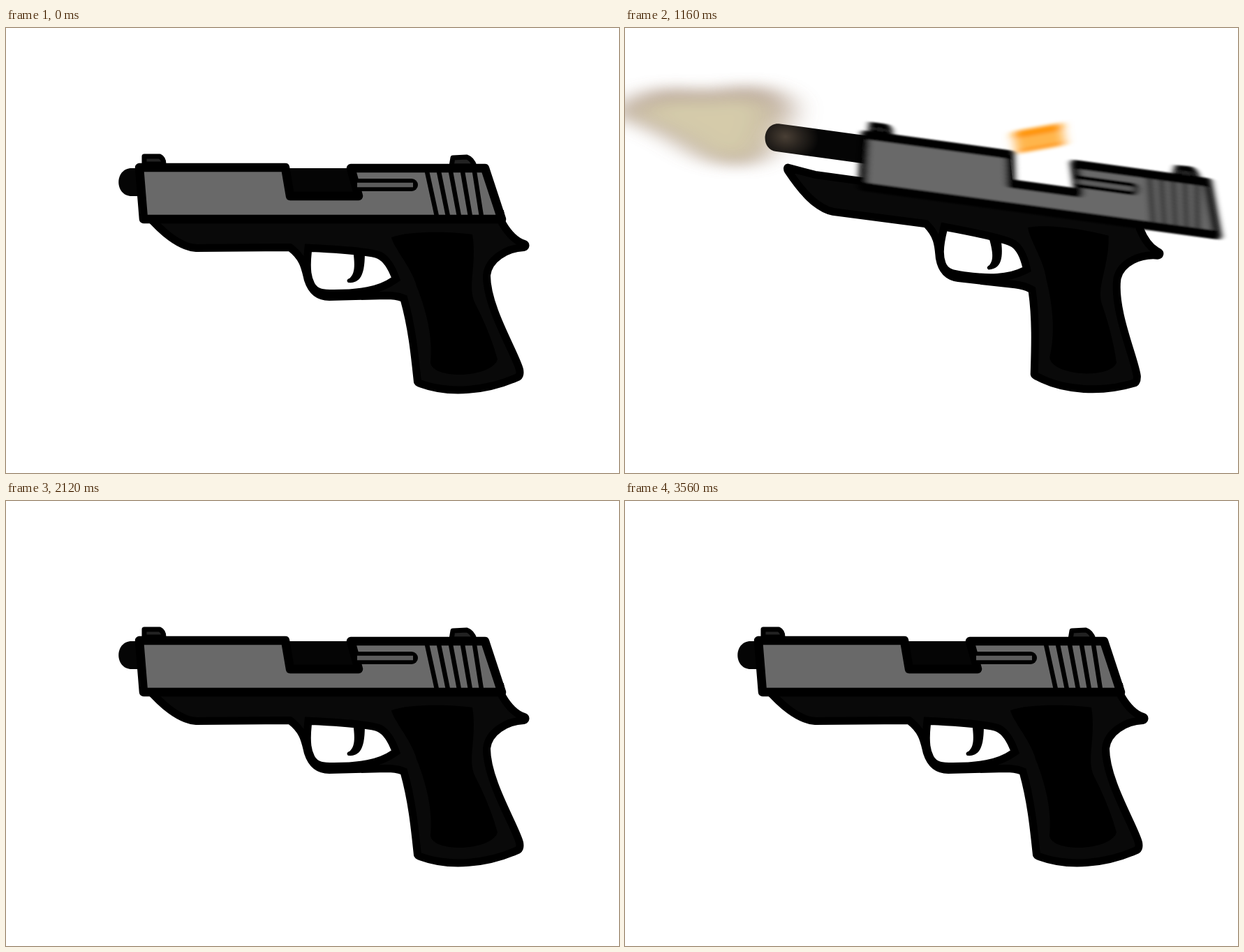
Animation of 878x638 px, one loop 3.84 s. Source, as an HTML page:

```html
<!DOCTYPE html>
<html lang="en">
<head>
<meta charset="utf-8">
<title>Pistol loop</title>
<style>
  html, body { margin: 0; width: 100%; height: 100%; overflow: hidden; background: #fff; }
  svg { display: block; width: 100vw; height: 100vh; }
  .glow { mix-blend-mode: screen; }
  .line { fill: none; stroke: #000; stroke-linecap: round; }
</style>
</head>
<body>
<svg viewBox="0 0 878 638">
  <defs>
    <filter id="slideBlur" x="-10%" y="-10%" width="120%" height="120%"><feGaussianBlur/></filter>
    <filter id="shellBlur" x="-50%" y="-50%" width="200%" height="200%"><feGaussianBlur stdDeviation="8 2.5"/></filter>
    <filter id="blastBlur" x="-80%" y="-100%" width="260%" height="300%"><feGaussianBlur/></filter>
    <radialGradient id="hot">
      <stop stop-color="#6a5000"/><stop offset="1" stop-color="#000"/>
    </radialGradient>
    <radialGradient id="warm">
      <stop stop-color="#453b31"/><stop offset="1" stop-color="#000"/>
    </radialGradient>
    <radialGradient id="haze">
      <stop stop-color="#777" stop-opacity=".36"/><stop offset=".5" stop-color="#888" stop-opacity=".16"/>
      <stop offset="1" stop-color="#999" stop-opacity="0"/>
    </radialGradient>
    <path id="framePath" clip-rule="evenodd" fill-rule="evenodd" d="M199 257C194 258 193 264 197 269C220 295 245 318 272 320L405 319
      C423 333 424 346 428 362C435 384 448 390 463 390L545 388Q558 388 566 391C577 430 581 470 585 508Q586 512 592 514
      C635 530 690 525 736 504Q742 500 740 489C734 465 693 400 693 355C695 335 718 320 742 319C750 317 751 308 743 305
      C731 301 722 290 715 278L712 262L240 262Z
      M437 320C434 348 437 358 441 366C446 376 455 376 470 376C505 376 533 372 553 358C548 345 541 334 533 330Q520 324 437 320Z"/>
    <clipPath id="frameClip"><use href="#framePath" clip-rule="evenodd"/></clipPath>
  </defs>
  <rect width="878" height="638" fill="#fff"/>
  <ellipse id="puff" cx="522" cy="182" rx="125" ry="115" fill="url(#haze)"/>
  <g id="blast" filter="url(#blastBlur)">
    <path id="outer" d="M-100-18C-70-60-40-68 0-56C40-66 75-74 92-38C98-10 78 40 62 62C40 76 10 70-12 48C-40 18-70-2-100-18Z"/>
    <path id="inner" d="M-72-18C-50-42-25-42 5-36C35-44 62-48 68-22C66 10 58 40 44 55C26 62 8 48-8 30C-30 8-50-6-72-18Z"/>
  </g>
  <g id="gun">
    <path fill="#050505" d="M180 201H512L522 241H180C155 241 155 201 180 201Z"/>
    <path id="trigger" d="M497 318H514C514 345 512 367 490 365C487 362 489 360 492 359C500 352 500 340 497 318Z"/>
    <use href="#framePath" stroke="#000" stroke-width="2"/>
    <use href="#framePath" fill="#090909" stroke="#000" stroke-width="20" clip-path="url(#frameClip)"/>
    <path d="M552 300C580 290 640 292 668 296C675 340 660 370 672 395C690 430 700 460 704 475C700 490 670 497 650 497
      C630 497 610 492 608 480C612 440 600 400 588 370C582 345 555 315 552 300Z"/>
    <g id="slide">
      <g fill="#222" stroke="#000" stroke-width="7" stroke-linejoin="round">
        <path d="M198 195V184H220Q226 187 226 195Z"/>
        <path d="M638 198L640 186L660 185Q668 188 671 198Z"/>
      </g>
      <path fill="#696969" stroke="#000" stroke-width="12.5" stroke-linejoin="round"
        d="M191 200H400L407 241H505L494 201H686L710 274H197Z"/>
      <path class="line" stroke-width="18" d="M504 225H581"/>
      <path class="line" style="stroke:#5c5c5c;stroke-linecap:butt" stroke-width="6.5" d="M503 225H583"/>
      <path class="line" stroke-width="6.5" d="M603 206l14 64M620 206l13 64M637 206l12 64M654 206l11 64M671 206l10 64"/>
    </g>
  </g>
  <g id="flash">
    <ellipse class="glow" cx="200" cy="228" rx="44" ry="66" fill="url(#hot)"/>
    <circle class="glow" cx="495" cy="208" r="32" fill="url(#hot)"/>
    <circle class="glow" cx="655" cy="188" r="32" fill="url(#hot)"/>
  </g>
  <ellipse id="tip" class="glow" cx="190" cy="218" rx="48" ry="36" fill="url(#warm)"/>
  <g id="shell">
    <rect x="-35" y="-16" width="70" height="32" rx="3" fill="#ff960f"/>
    <rect x="-35" y="-5" width="70" height="16" fill="#ffb54c"/>
  </g>
</svg>
<script>
const STEP = 40, LOOP = 3840, SHOTS = [840, 1080, 1880], RACK = 2960;

// One value per step of a shot
const TILT = [0, 4.2, 7.8, 4.63, 2.2, 0.8];
const SLIDE = [0, 56, 112, 55, 0, 0];
const PULL = [-24, -24, -16, -8, 0, 0];
const SLIDE_BLUR = [0, 2.5, 5, 2.5, 0, 0];
// x, y, scale x, scale y, blur x, blur y, opacity
const BLAST = [
  [95, 220, 1, 1, 6, 6, 1],
  [100, 195, 1.1, 0.95, 9, 8, 0.9],
  [112, 138, 1.35, 0.85, 16, 11, 0.8],
  [90, 135, 1.25, 1.75, 24, 22, 0.7],
  [90, 130, 1.3, 1.9, 30, 28, 0.35],
  [90, 120, 1.3, 2, 34, 32, 0.12]
];
const RACK_SLIDE = [47, 106, 53];

const $ = id => document.getElementById(id);
const set = (id, attrs) => {
  for (const name in attrs) $(id).setAttribute(name, attrs[name]);
};
const toggle = (id, on) => { $(id).style.display = on ? '' : 'none'; };
const show = (id, opacity) => {
  toggle(id, opacity > 0);
  set(id, { opacity });
};
const deviation = (id, x, y) => $(id).firstElementChild.setAttribute('stdDeviation', `${x} ${y}`);
const layer = (id, front) => front ? $('gun').after($(id)) : $('gun').before($(id));

function poseGun(tilt, offset, pull, blur) {
  const turn = `rotate(${tilt} 667 478)`;
  set('gun', { transform: turn });
  set('tip', { transform: turn });
  set('trigger', { transform: `rotate(${pull} 506 316)` });
  set('slide', { transform: `translate(${offset})`, filter: blur ? 'url(#slideBlur)' : 'none' });
  deviation('slideBlur', blur, 0.8);
}

function poseShell(x, y, angle, blurred, front) {
  toggle('shell', true);
  set('shell', { transform: `translate(${x} ${y}) rotate(${angle})`, filter: blurred ? 'url(#shellBlur)' : 'none' });
  layer('shell', front);
}

function poseBlast(i) {
  const [x, y, sx, sy, bx, by, opacity] = BLAST[i];
  const burning = i < 2;
  show('blast', opacity);
  set('blast', { transform: `translate(${x} ${y}) scale(${sx} ${sy})` });
  set('outer', { fill: burning ? '#ff8a24' : '#ab9482' });
  set('inner', { fill: burning ? '#ffcb3c' : '#cbbf96' });
  deviation('blastBlur', bx, by);
  layer('blast', burning);
}

function draw(time) {
  const t = Math.floor(time % LOOP / STEP) * STEP;
  const start = SHOTS.find(s => t >= s && t < s + 6 * STEP);
  const i = start === undefined ? -1 : (t - start) / STEP;
  const rack = t - RACK;

  show('puff', i === 3 ? 1 : i === 4 ? 0.5 : 0);
  toggle('flash', i === 0);
  toggle('tip', i === 2 || i === 3);
  toggle('shell', false);

  if (i >= 0) {
    poseGun(TILT[i], SLIDE[i], PULL[i], SLIDE_BLUR[i]);
    poseBlast(i);
    if (i === 1) poseShell(550, 206, 0, true, false);
    if (i > 1) poseShell(593 + 113 * (i - 2), 158 - 60 * (i - 2), -10 - 86 * (i - 2), true, false);
    return;
  }
  show('blast', 0);
  poseGun(0, RACK_SLIDE[rack / STEP] || 0, 0, 0);
  if (rack >= 0 && rack < 600) {
    const fall = (rack - 190) / 330;
    poseShell(545 + 0.21 * rack, 97 + (fall < 0 ? 374 : 445) * fall * fall, -0.5 * rack, false, rack > 80);
  }
}

function tick(now) {
  draw(now);
  requestAnimationFrame(tick);
}
draw(0);
requestAnimationFrame(tick);
</script>
</body>
</html>
```
